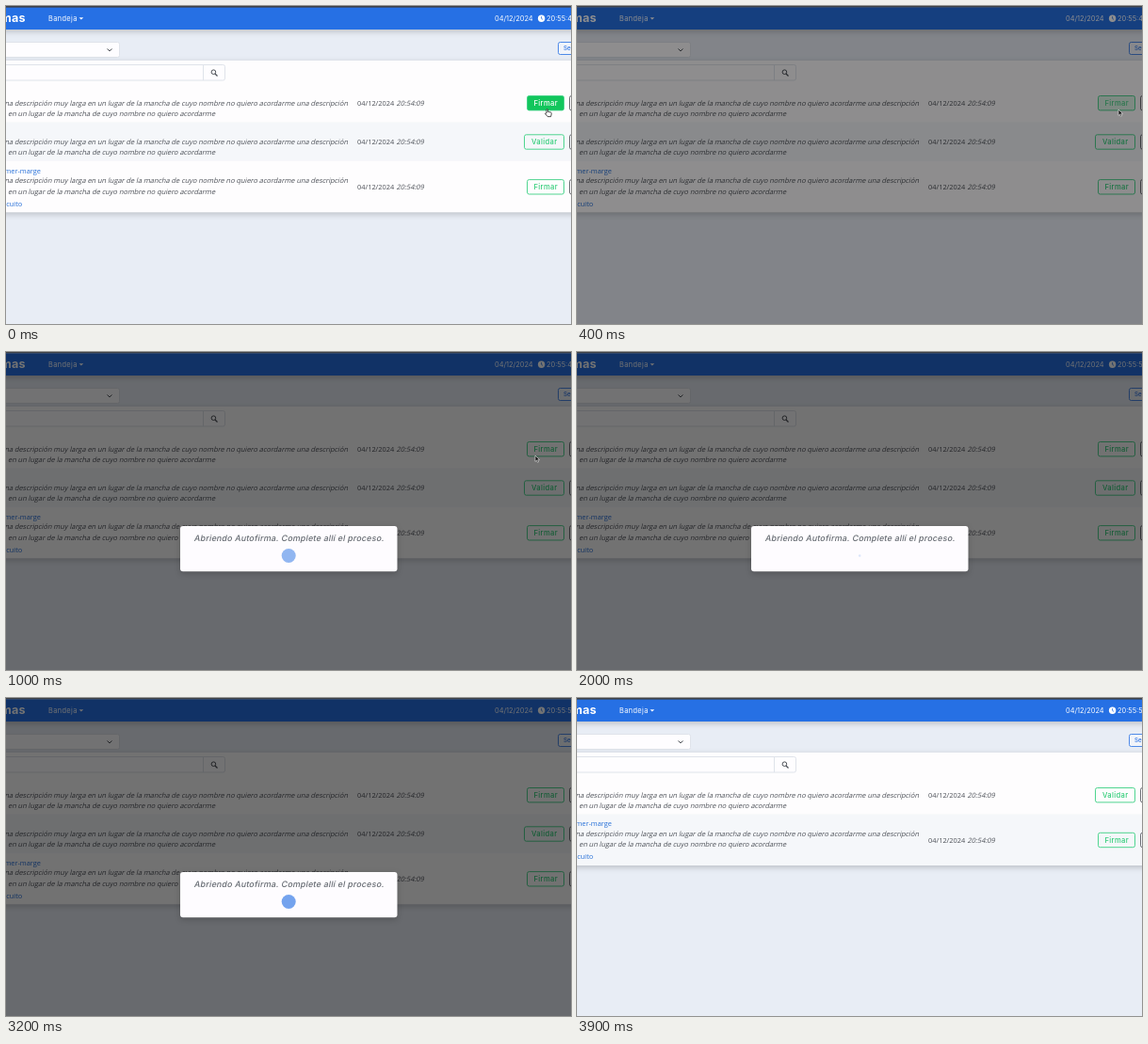
An HTML page for the animation above (4 s loop, 600 px wide and 338 px high).

```html
<!DOCTYPE html>
<html lang="es">
<head>
<meta charset="utf-8">
<title>Bandeja</title>
<style>
html, body { margin: 0; height: 100%; overflow: hidden; background: #e8edf5; }
svg { display: block; width: 100%; height: 100%; }
text { font: 7.4px "Open Sans", "Noto Sans", sans-serif; fill: #4b4f56; white-space: pre; }
.ui { font-family: Inter, sans-serif; }
.white { fill: #fff; }
.link { fill: #2670d8; }
.end { text-anchor: end; }
.mid { text-anchor: middle; }
.btn { font: 500 7.6px Inter, sans-serif; letter-spacing: .35px; fill: #2dcc76; }
.line { fill: none; stroke: #4b4f56; }
.shadow { filter: drop-shadow(0 2px 3px #0003); }
</style>
</head>
<body>
<svg viewBox="0 0 600 338">
  <rect width="600" height="338" fill="#e8edf5"/>
  <rect class="shadow" x="-9" width="618" height="25" fill="#2670e4"/>
  <text class="ui white end" x="20.7" y="17.2" style="font-size:12.6px;font-weight:700;letter-spacing:.2px">Firmas</text>
  <text class="ui white" x="45" y="16" style="letter-spacing:.36px">Bandeja</text>
  <path d="M77.6 12.2h4.6l-2.3 2.4z" fill="#fff"/>
  <text class="ui white" x="519" y="16">04/12/2024</text>
  <circle cx="568.6" cy="13.2" r="3.7" fill="#fff"/>
  <path d="M568.6 11v2.4l1.5 1" fill="none" stroke="#2670e4" stroke-width=".8"/>
  <text class="ui white" id="clock" x="574" y="16"></text>

  <rect x="-9" y="38.5" width="129.5" height="16" rx="2" fill="#fefdff" stroke="#dfe3ea"/>
  <path class="line" d="M107.5 45.5l2.5 2.4 2.5-2.4"/>
  <rect x="586.5" y="38.5" width="30" height="13" rx="2" fill="#f1f4fa" stroke="#2670e4" stroke-width=".8"/>
  <text class="ui" x="592" y="47.2" style="font-size:6.2px;font-weight:500;fill:#2670e4">Se</text>

  <rect class="shadow" id="card" x="-9" y="58" width="618" fill="#fefdfe"/>
  <rect x="-9" y="62.5" width="241.5" height="16.5" rx="2" fill="#fefdff" stroke="#dfe3ea"/>
  <path class="line" d="M209.5 63v16" style="stroke:#dfe3ea"/>
  <circle class="line" cx="220.4" cy="70.2" r="2.3"/>
  <path class="line" d="M222 72l2.5 2.5" stroke-width="1.3"/>

  <rect id="stripe" x="-9" y="123.5" width="618" fill="#f5f7fa"/>
  <g id="first"></g>
  <g id="rest"></g>

  <rect id="shade" y="1.5" width="600" height="337"/>
  <rect width="600" height="1.6" fill="#3f4247"/>

  <g id="modal">
    <rect class="shadow" x="185" y="185" width="230.5" height="48.3" rx="3" fill="#fefcff"/>
    <text class="ui mid" transform="translate(300.5 201.2) skewX(-11)" style="font-size:8.9px;font-weight:500;letter-spacing:.2px;fill:#666b72">Abriendo Autofirma. Complete allí el proceso.</text>
    <circle id="spinner" cx="300.2" cy="216.5" fill="#2670e4"/>
  </g>

  <path id="hand" transform="translate(572 109)" fill="#fff" stroke="#222" stroke-width=".8" stroke-linejoin="round"
    d="M2 5V1q.7-1 1.4 0v2.4l3 .6q1 .3.9 1.4L6.6 8.6H3.2L.6 5.6Q.5 4.6 2 5z"/>
  <path id="arrow" fill="#111" stroke="#eee" stroke-width=".6" d="M0 0v6.4l1.5-1.3 1 2.3 1.1-.5-1-2.2h2z"/>
</svg>
<script>
const $ = id => document.getElementById(id);
const LOOP = 4000, ROW = 41.3;
const OPEN = 434, CLOSE = 3210;

const slanted = (x, y, s, cls = '') =>
  `<text class="${cls}" transform="translate(${x} ${y}) skewX(-13)">${s}</text>`;

// One table row; y is the middle of its button
function row(y, textY, label, x) {
  const place = 'en un lugar de la mancha de cuyo nombre no quiero acordarme';
  return slanted(363, textY, `una descripción muy larga ${place} una descripción`, 'end')
    + slanted(2, textY + 11.2, place)
    + `<text x="373" y="${y + 2.7}">04/12/2024</text>`
    + slanted(414.5, y + 2.7, '20:54:09')
    + `<rect class="box" x="${x}" y="${y - 7.7}" width="${592.5 - x}" height="15.4" rx="2" fill="#12c65c" fill-opacity="0" stroke="#3dd184" stroke-width=".9"/>`
    + `<text class="btn mid" x="${(x + 592.5) / 2 + .2}" y="${y + 2.7}">${label}</text>`
    + `<rect class="line" x="598.5" y="${y - 7.7}" width="30" height="15.4" rx="2" stroke-width=".8"/>`;
}

$('first').innerHTML = row(103.2, 105.7, 'Firmar', 553.5);
$('rest').innerHTML = row(144.5, 147, 'Validar', 550.5)
  + row(192.3, 188.3, 'Firmar', 553.5)
  + '<text class="link end" x="37" y="177.5">mer-marge</text>'
  + '<text class="link end" x="17.3" y="212.8">cuito</text>';
const box = document.querySelector('#first .box');
const label = document.querySelector('#first .btn');

const ramp = (t, start, len) => Math.min(1, Math.max(0, (t - start) / len));
const easeOut = p => 1 - (1 - p) ** 1.75;
const set = (el, attrs) => { for (const k in attrs) el.setAttribute(k, attrs[k]); };
const show = (el, on) => set(el, { visibility: on ? 'visible' : 'hidden' });

function draw(t) {
  // Table: the first row goes away once signed
  const done = t >= CLOSE;
  show($('first'), !done);
  set($('rest'), { transform: `translate(0 ${done ? -ROW : 0})` });
  set($('card'), { height: done ? 120 : 161.3 });
  set($('stripe'), { height: done ? 54.5 : ROW });
  $('clock').textContent = t < 1500 ? '20:55:49' : '20:55:52';

  // Hover colour leaves the button
  const hover = 1 - ramp(t, 270, 150);
  set(box, { 'fill-opacity': hover });
  label.style.fill = `color-mix(in srgb, #fff ${hover * 100}%, #2dcc76)`;

  // Backdrop
  const dark = ramp(t, 280, 150) - ramp(t, CLOSE + 145, 145);
  set($('shade'), { opacity: dark * .55 });

  // Dialog
  const lift = 1 - easeOut(ramp(t, OPEN, 300)) + easeOut(ramp(t, CLOSE, 300));
  set($('modal'), {
    opacity: ramp(t, OPEN, 150) - ramp(t, CLOSE, 150),
    transform: `translate(0 ${-23 * lift})`
  });
  const phase = Math.max(0, t - OPEN - 6) % 750 / 375;
  set($('spinner'), { r: 7.5 * Math.min(1, phase), opacity: Math.min(phase, 2 - phase) });

  // Pointer
  show($('hand'), t < 300);
  show($('arrow'), t >= 300 && t < 1300);
  set($('arrow'), { transform: `translate(${575 - 13 * ramp(t, 750, 250)} 110)` });
}

function frame() {
  draw(performance.now() % LOOP);
  requestAnimationFrame(frame);
}
frame();
</script>
</body>
</html>
```
